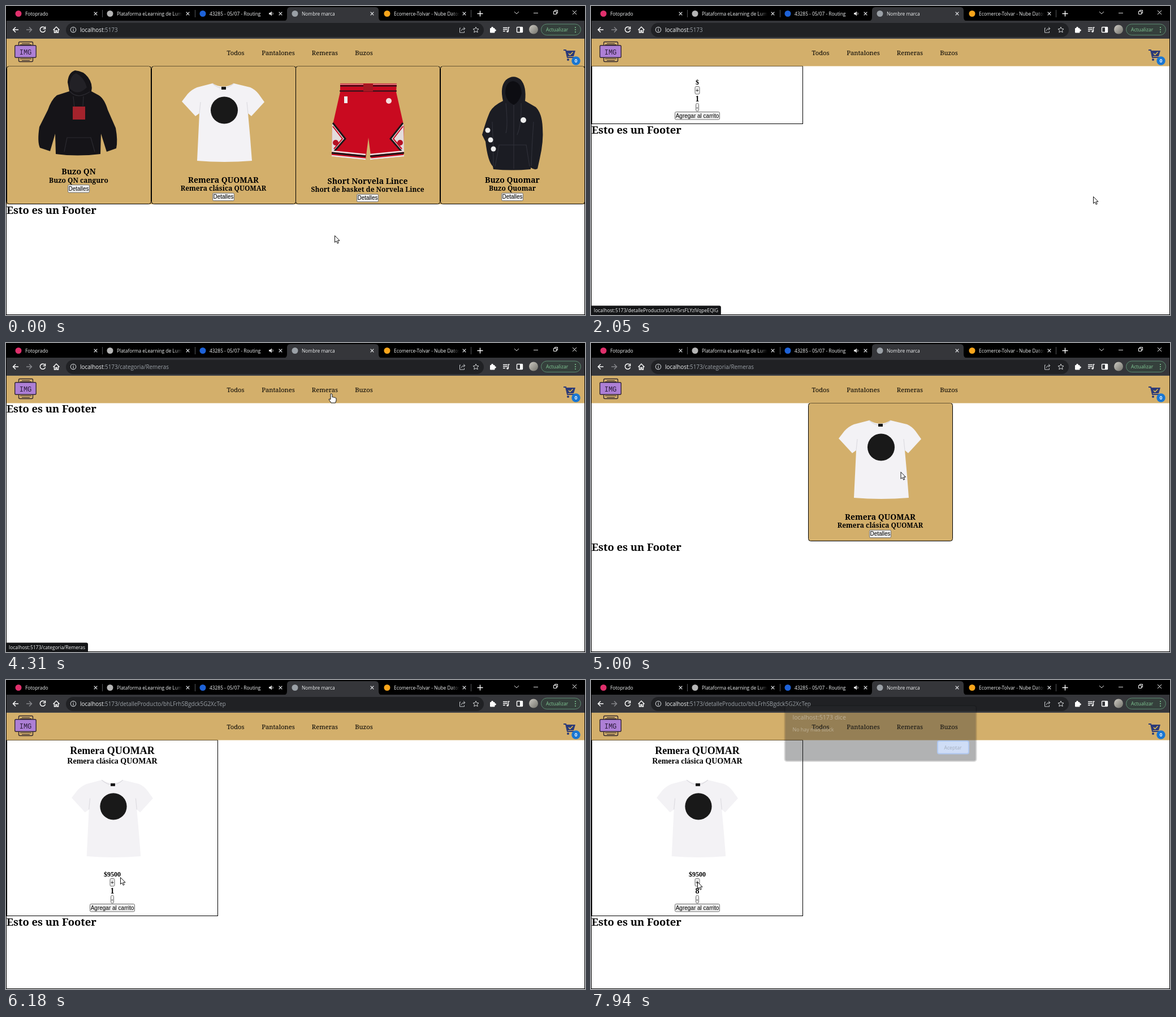
Recreate the animation shown at these times as an HTML page with a canvas. Size 1024x547 px, loop 8 s.

```html
<!DOCTYPE html>
<html lang="es">
<head>
<meta charset="utf-8">
<title>Tienda</title>
<style>
html, body { margin: 0; width: 100%; height: 100%; overflow: hidden; background: #fff; }
canvas { display: block; }
</style>
</head>
<body>
<canvas id="stage" width="1024" height="547"></canvas>
<script>
const ctx = document.getElementById('stage').getContext('2d');
const LOOP = 8000, TAN = '#d3af6b', BAR = '#35363a';
const UI = '"Open Sans", sans-serif', SANS = '"Liberation Sans", sans-serif';
const SERIF = '"Noto Serif", serif', TIMES = '"Liberation Serif", serif';

function text(s, x, y, font, color = '#000', align = 'left') {
  ctx.font = font;
  ctx.fillStyle = color;
  ctx.textAlign = align;
  ctx.fillText(s, x, y);
}
const centered = (s, x, y, font, color) => text(s, x, y, font, color, 'center');

function rect(x, y, w, h, color) {
  ctx.fillStyle = color;
  ctx.fillRect(x, y, w, h);
}
function round(x, y, w, h, r, fill, stroke, width = 1) {
  ctx.beginPath();
  ctx.roundRect(x, y, w, h, r);
  if (fill) { ctx.fillStyle = fill; ctx.fill(); }
  if (stroke) { ctx.strokeStyle = stroke; ctx.lineWidth = width; ctx.stroke(); }
}
function disc(x, y, r, fill, stroke) {
  ctx.beginPath();
  ctx.arc(x, y, r, 0, 7);
  if (fill) { ctx.fillStyle = fill; ctx.fill(); }
  if (stroke) { ctx.strokeStyle = stroke; ctx.lineWidth = 1.2; ctx.stroke(); }
}
function line(d, color, width = 1.2) {
  ctx.strokeStyle = color;
  ctx.lineWidth = width;
  ctx.stroke(new Path2D(d));
}
function shape(d, color) {
  ctx.fillStyle = color;
  ctx.fill(new Path2D(d));
}
const cross = (x, y, r, color, w) =>
  line(`M${x - r} ${y - r}L${x + r} ${y + r}M${x + r} ${y - r}L${x - r} ${y + r}`, color, w);

// ---- browser frame ----
const tabs = [
  { x: 22, title: 'Fotoprado', icon: '#e0306c', close: 158 },
  { x: 184, title: 'Plataforma eLearning de Lumbre', icon: '#b5b5b5', close: 321 },
  { x: 348, title: '43285 - 05/07 - Routing', icon: '#1d62d8', close: 485 },
  { x: 511, title: 'Nombre marca', icon: '#9aa0a6', close: 647 },
  { x: 674, title: 'Ecomerce-Tolvar - Nube Datos', icon: '#f8a51b', close: 810 },
];

function drawTabs() {
  rect(0, 0, 1024, 27, '#000');
  shape('M490 27Q497 27 497 20V8Q497 2 503 2H653Q659 2 659 8V20Q659 27 666 27Z', BAR);
  for (const { x, title, icon, close } of tabs) {
    disc(x, 13.5, 5.5, icon);
    const left = x + 12, end = x + 128;
    const fade = ctx.createLinearGradient(end - 15, 0, end, 0);
    fade.addColorStop(0, '#f1f3f4');
    fade.addColorStop(1, '#f1f3f400');
    text(title, left, 17, '8.4px ' + UI, fade);
    cross(close + .5, 13.5, 2.8, '#e8eaed');
  }
  for (const x of [170, 334, 822]) rect(x, 7, 1, 13, '#55565a');
  shape('M465 12h2l3-2.5v8l-3-2.5h-2z', '#ddd');
  line('M471.5 11.5q1.5 2 0 4', '#ddd', 1);
  line('M833.5 13.5h10M838.5 8.5v10', '#fff', 1.4);
  line('M899 10l4 4 4-4M933 12.5h8', '#ddd', 1);
  line('M968.500 9.500h5v5h-5zM970.500 9.500v-2h5v5h-2', '#fff', 1);
  cross(1005.5, 11.5, 3.5, '#fff', 1);
}

function drawToolbar(path) {
  rect(0, 26, 1024, 32, BAR);
  line('M22 42h-9M17 37.500L12.500 42L17 46.500', '#fff', 1.5);
  line('M36 42h9M41 37.500L45.500 42L41 46.500', '#85868a', 1.5);
  line('M68.500 38.500A4.700 4.700 0 1 0 69.500 43M69.500 36.500v4h-4', '#fff', 1.5);
  line('M83.500 42.500L89 37L94.500 42.500M85.500 41.500V47h2.500v-3.500h2V47h2.500v-5.500', '#fff', 1.4);
  round(106, 30, 739, 25, 12.5, '#202124');
  disc(119, 42, 4.7, null, '#c4c7ca');
  rect(118.5, 41, 1.2, 4, '#c4c7ca');
  rect(118.5, 39, 1.2, 1.2, '#c4c7ca');
  text('localhost', 131, 46, '9.9px ' + UI, '#f1f3f4');
  const host = ctx.measureText('localhost').width;
  text(':5173' + path, 131 + host, 46, '9.9px ' + UI, '#9aa0a6');

  line('M804 39h-1.500v8h8v-2.500M805 44q1-4 6-4M809 37.500l3 2.500-3 2.500', '#c4c7ca', 1);
  line('M831 37.200l1.500 3.200 3.500.4-2.600 2.400.8 3.500-3.200-1.800-3.200 1.800.8-3.500-2.600-2.400 3.500-.4z', '#d2d4d6', 1);
  round(856, 39, 8.5, 8.5, 1, '#fff');
  disc(860, 38.5, 1.8, '#fff');
  disc(865, 43, 1.8, '#fff');
  line('M879 38.500h8M879 41.500h8M879 44.500h4M888.500 45v-7h2', '#fff', 1.3);
  disc(887, 45, 1.8, '#fff');
  round(903.5, 37.5, 10, 9, 1, null, '#fff', 1.4);
  rect(909, 37, 5, 10, '#fff');
  const skin = ctx.createLinearGradient(926, 34, 940, 49);
  skin.addColorStop(0, '#c9c6bf');
  skin.addColorStop(1, '#77766f');
  disc(933, 41.5, 8, skin);
  round(946.5, 32, 70, 19.5, 10, '#35403c', '#5d8c72');
  text('Actualizar', 955, 45, '8.6px ' + UI, '#81c995');
  for (const y of [38, 42, 46]) disc(1007, y, 1, '#81c995');
}

function drawNav() {
  rect(0, 58, 1024, 48.5, TAN);
  rect(0, 57, 1024, 1, '#4b4c4f');
  round(22.5, 63.5, 25, 35, 2, null, '#33282f', 1.4);
  line('M28 66.500h14M25 68.500h20M25 93.500h20M28 96.500h14', '#33282f', 1.2);
  round(15.7, 69.7, 37.5, 21.5, 2, '#ad7fd6', '#33282f', 1.4);
  centered('IMG', 34.5, 85.5, '12px "Liberation Mono", monospace', '#2a1a38');

  const links = { Todos: 406, Pantalones: 481.5, Remeras: 564, Buzos: 633 };
  for (const name in links) centered(name, links[name], 87, '11.2px ' + SERIF);

  line('M986 78h4l3 13h12', '#2c3a78', 2);
  shape('M990 79h17l-3 10h-12z', '#2c3a78');
  disc(994, 95, 2, '#2c3a78');
  line('M995 84l2.500 2.500 5-5', '#f0c84c', 1.4);
  disc(1008, 97, 7.7, '#1976d2');
  centered('0', 1008, 100.3, 'bold 9px ' + SANS, '#fff');
}

function drawStatus(path) {
  const s = 'localhost:5173' + path;
  ctx.font = '8.5px ' + UI;
  round(0, 530.5, ctx.measureText(s).width + 10, 17, [0, 3, 0, 0], '#141517');
  text(s, 5, 542, '8.5px ' + UI, '#f1f3f4');
}

// ---- products, each drawn at its place in the full list ----
function kangaroo() {
  shape('M112 151L109 135Q110 118 122 114Q137 115 145 126Q154 138 151 151L164 158Q174 164 180 184L194 216Q198 238 195 252L178 258L168 226L167 262Q126 267 88 262L87 226L78 257L60 251Q55 240 59 214L74 184Q80 166 90 158Z', '#151418');
  line('M113 151Q126 166 148 152M119 160l2 20M137 160l-1 17M103 258l5-25h42l7 25', '#2c2b31', 1.2);
  shape('M112 145Q113 122 124 119Q138 126 143 144Q126 161 112 145Z', '#222126');
  rect(118, 178, 22, 23, '#a3232c');
}
function tee() {
  shape('M365 137Q384 148 403 137L432 144Q441 148 447 156L457 170L434 195L428 190Q432 232 435 274Q386 278 338 274Q340 232 342 190L335 195L311 169L321 156Q328 148 338 144Z', '#f3f2f5');
  line('M365 137Q384 154 403 137M342 190l2-20M428 190l-2-20', '#dcdbe0', 1.2);
  rect(381, 143, 8, 5, '#161616');
  disc(386, 184.5, 24, '#191919');
}
function shorts() {
  shape('M591 137H691L690 152L704 214L703 266L646 272L641 233L636 272L576 266L577 214L591 152Z', '#c90a20');
  line('M591 138.500H691', '#e6d2c8', 1.2);
  line('M591 141.500H691M590 150.500H691', '#20141a', 2);
  rect(632, 138, 17, 13, '#a51822');
  for (const side of [1, -1]) {
    ctx.save();
    ctx.translate(640, 0);
    ctx.scale(side, 1);
    shape('M-62 207L-40 235L-61 258L-64 258L-63 207Z', '#e3dcdc');
    line('M-62 207L-40 235L-60 258', '#1e1518', 3);
    line('M-62 213L-45 235L-60 253', '#c90a20', 2);
    line('M-64 257L-4 263', '#ede5e5', 2.5);
    line('M-64 260L-4 266', '#1e1518', 3);
    line('M-64 265L-4 271', '#ede5e5', 2.5);
    disc(-57, 242, 5, '#b51124');
    ctx.restore();
  }
  rect(598, 160, 6, 12, '#eee');
  disc(677, 168, 5, '#f5dede');
}
function zipper() {
  shape('M879 168Q873 143 884 131Q897 120 910 130Q921 142 918 168L937 179Q948 190 949 215Q951 240 944 270L940 288Q935 291 928 286V289Q895 292 862 289L861 284Q852 275 848 240L842 228Q850 200 856 187Q862 176 879 168Z', '#1b1c23');
  shape('M883 155Q883 134 897 133Q911 135 912 155Q907 171 898 175Q886 170 883 155Z', '#0d0d12');
  line('M898 175V288M884 172q4 40 0 53M911 172q1 38-7 56M865 284l7-38h48l6 38M860 205q2 40 2 78M933 205q-3 40-4 78', '#30313a', 1.1);
  for (const [x, y] of [[852, 220], [857, 237], [862, 253]]) disc(x, y, 4.5, '#eee');
  disc(915, 202, 5, '#eee');
}
const products = [
  { name: 'Buzo QN', about: 'Buzo QN canguro', art: kangaroo, y: 298 },
  { name: 'Remera QUOMAR', about: 'Remera clásica QUOMAR', art: tee, y: 312.5, mid: 384, price: '$9500' },
  { name: 'Short Norvela Lince', about: 'Short de basket de Norvela Lince', art: shorts, y: 314.5 },
  { name: 'Buzo Quomar', about: 'Buzo Quomar', art: zipper, y: 312.5, mid: 896, price: '$17800', soldOut: true },
];
const [, teeItem, , zipItem] = products;

// ---- pages ----
function button(label, x, y, w, h = 13.5) {
  round(x - w / 2, y, w, h, 2, '#efefef', '#6f6f6f');
  centered(label, x, y + h / 2 + 3.4, '10px ' + SANS);
}
const footer = top => text('Esto es un Footer', 1, top + 17, 'bold 18.4px ' + SERIF);

function card(item, dx = 0) {
  const i = products.indexOf(item), x = 1.5 + Math.round(255.7 * i) + dx, mid = x + 127;
  round(x, 106.5, 255, 244, 4, TAN, '#000');
  ctx.save();
  ctx.translate(dx, 0);
  item.art();
  ctx.restore();
  centered(item.name, mid, item.y, 'bold 14px ' + SERIF);
  centered(item.about, mid, item.y + 14.7, 'bold 12px ' + SERIF);
  button('Detalles', mid, item.y + 18.7, 38);
}
function list() {
  rect(0, 106, 1024, 245, TAN);
  for (const item of products) card(item);
  footer(351);
}
function category() {
  card(teeItem, 127);
  footer(351);
}
function detail(item, count) {
  const mid = 188, dy = item ? 0 : -209;
  const bottom = item?.soldOut ? 375.5 : 417.5 + dy;
  ctx.strokeStyle = '#000';
  ctx.lineWidth = 1;
  ctx.strokeRect(1.5, 106.5, 373, bottom - 106.5);
  if (item) {
    centered(item.name, mid, 130.5, 'bold 18px ' + TIMES);
    centered(item.about, mid, 147.5, 'bold 14px ' + TIMES);
    ctx.save();
    ctx.translate(188, 246);
    ctx.scale(.985, .985);
    ctx.translate(-item.mid, -207);
    item.art();
    ctx.restore();
  }
  centered(item ? item.price : '$', mid, 347.5 + dy, 'bold 12px ' + TIMES);
  if (item?.soldOut) {
    centered('Sin Stock', mid, 363.5, 'bold 14px ' + TIMES);
  } else {
    button('+', mid, 351.5 + dy, 8);
    centered(count, mid, 378 + dy, 'bold 14px ' + TIMES);
    button('-', mid, 381.5 + dy, 5);
    button('Agregar al carrito', mid, 396.5 + dy, 79);
  }
  footer(bottom);
}

function dialog() {
  round(342.5, 45.5, 339, 98.5, 4, null, 'rgba(0,0,0,.15)', 2);
  round(343.5, 46, 337, 97, 3, 'rgba(41,42,45,.36)');
  text('localhost:5173 dice', 356.5, 70, '10.6px ' + UI, 'rgba(255,255,255,.4)');
  text('No hay más stock', 356.5, 91, '8.9px ' + UI, 'rgba(255,255,255,.4)');
  round(613, 108, 55, 22.5, 3, '#cfddf6', '#b0c8f0', 2);
  centered('Aceptar', 640, 122.5, '8.6px ' + UI, '#a3adbd');
}

// ---- time ----
const ZIP_URL = '/detalleProducto/sUhH5rsFLYzIVqpeEQlG';
const TEE_URL = '/detalleProducto/bhLFrhSBgdck5G2XcTep';
const CAT_URL = '/categoria/Remeras';
const at = (steps, t) => steps.filter(s => s[0] <= t).pop()[1];

const clicks = [1960, 4080, 5340, 6330, 6540, 6740, 6930, 7140, 7370, 7590, 7800];
const added = t => clicks.filter(c => c > 6000 && c < 7800 && c + 60 <= t).length;
const pages = [
  [0, list], [2050, () => detail(null, 1)], [2330, () => detail(zipItem)],
  [4170, () => footer(106)], [4380, category], [5380, () => detail(null, 1)],
  [5690, t => detail(teeItem, 1 + added(t))],
];
const urls = [[0, ''], [2120, ZIP_URL], [4170, CAT_URL], [5480, TEE_URL]];
const statuses = [[0, ''], [1840, ZIP_URL], [2260, ''], [3980, CAT_URL], [4790, ''], [5200, TEE_URL], [5620, '']];
const path = [
  [0, 581, 406], [400, 581, 406], [640, 520, 385], [1160, 643, 331], [1700, 895, 331],
  [1960, 888, 337], [2090, 888, 337], [2810, 307, 367], [3080, 191, 345], [3630, 584, 104],
  [3980, 575, 90], [4650, 575, 90], [5290, 527, 331], [5480, 527, 331], [6180, 202, 349],
  [6260, 187, 357], [7100, 187, 357], [7140, 188, 357], [8000, 188, 357],
];

function pointer(t) {
  const i = path.findIndex(p => p[0] > t);
  const [t0, x0, y0] = path[i - 1], [t1, x1, y1] = path[i];
  const u = (t - t0) / (t1 - t0), e = u * u * (3 - 2 * u);
  return [x0 + (x1 - x0) * e, y0 + (y1 - y0) * e];
}
function drawPointer(t) {
  const [x, y] = pointer(t);
  if (clicks.some(c => t >= c && t < c + 85)) disc(x, y, 9.3, 'rgba(255,248,40,.6)');
  ctx.save();
  ctx.translate(x, y);
  const hand = y < 92 && y > 70;
  const d = hand
    ? 'M-1 0Q1 -1 2 1V6Q4 5 5 6.500Q6.500 5.500 7.500 7Q9 6.500 9 9V12L7.500 16H0L-4 10Q-4 8 -1 10Z'
    : 'M.5.5V12.500L3.300 10L5.200 14.300L7.200 13.400L5.300 9.300H9Z';
  shape(d, '#fff');
  line(d, '#111', 1);
  ctx.restore();
}

function draw(t) {
  rect(0, 0, 1024, 547, '#fff');
  at(pages, t)(t);
  drawTabs();
  drawToolbar(at(urls, t));
  drawNav();
  ctx.strokeStyle = '#000';
  ctx.lineWidth = 1;
  ctx.strokeRect(.5, .5, 1023, 546);
  const status = at(statuses, t);
  if (status) drawStatus(status);
  if (t >= 7930) dialog();
  drawPointer(t);
}
function tick() {
  draw(performance.now() % LOOP);
  requestAnimationFrame(tick);
}
tick();
</script>
</body>
</html>
```
